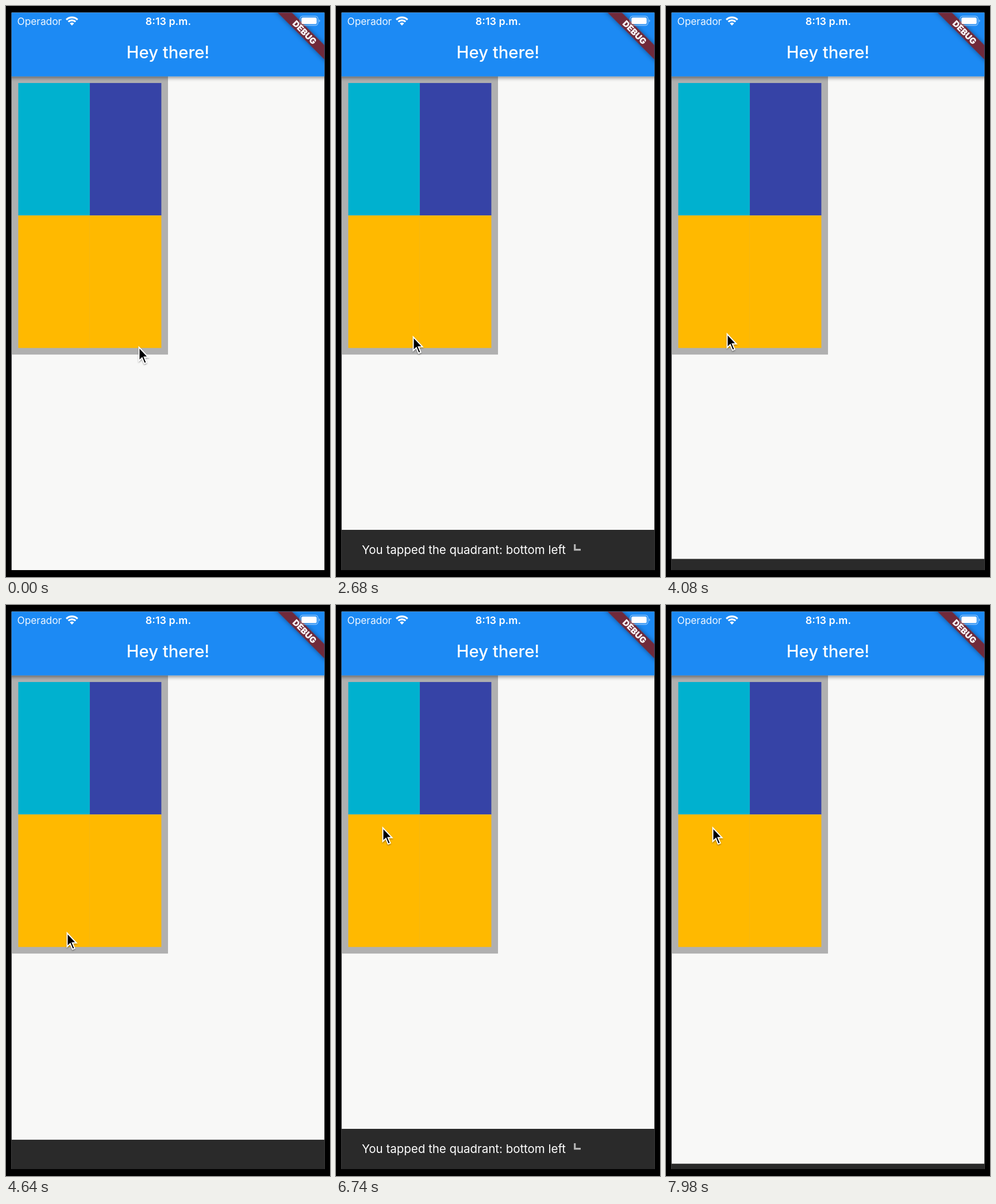
An HTML page for the animation above (8 s loop, 564 by 993 pixels).

```html
<!DOCTYPE html>
<html lang="en">
<head>
<meta charset="utf-8">
<title>Tapped quadrant</title>
<style>
  html, body { margin: 0; width: 100%; height: 100%; overflow: hidden; background: #000; }
  svg { display: block; width: 100%; height: 100%; }
  text { font-family: Inter, "Open Sans", sans-serif; fill: #fff; }
</style>
</head>
<body>
<svg viewBox="0 0 564 993">
  <defs>
    <clipPath id="screen"><rect x="9.7" y="11.6" width="544.6" height="969.4"/></clipPath>
    <filter id="barShadow" x="-5%" y="-10%" width="110%" height="130%">
      <feDropShadow dx="0" dy="3" stdDeviation="3" flood-opacity=".4"/>
    </filter>
    <filter id="bannerShadow" x="-20%" y="-80%" width="140%" height="260%">
      <feDropShadow dx="0" dy="0" stdDeviation="4" flood-opacity=".45"/>
    </filter>
    <filter id="cursorShadow" x="-50%" y="-50%" width="200%" height="200%">
      <feDropShadow dx="0" dy="1.5" stdDeviation="1.3" flood-opacity=".4"/>
    </filter>
  </defs>

  <g clip-path="url(#screen)">
    <rect x="9" y="11" width="546" height="970" fill="#f8f8f7"/>

    <rect x="9" y="122" width="273" height="484.2" fill="#b0b0b0"/>
    <g transform="translate(145.9 364.3)">
      <rect x="-124.5" y="-230.4" width="124.5" height="230.4" fill="#00b1cf"/>
      <rect y="-230.4" width="124.5" height="230.4" fill="#3643a6"/>
      <rect x="-124.5" width="124.5" height="230.4" fill="#ffb900"/>
      <rect width="124.5" height="230.4" fill="#ffb900"/>
    </g>

    <rect x="0" y="0" width="564" height="122.4" fill="#1c8af4" filter="url(#barShadow)"/>
    <text x="282" y="91" font-size="29.2" font-weight="500" text-anchor="middle">Hey there!</text>

    <g id="snackbar">
      <rect x="9" y="911" width="546" height="70" fill="#2a2a2a"/>
      <g id="message">
        <text x="45" y="953" font-size="20.47">You tapped the quadrant: bottom left</text>
        <path d="M415.7 936V945.6H426" fill="none" stroke="#b4b4b4" stroke-width="3.2"/>
      </g>
    </g>

    <g transform="translate(519.8 46) rotate(45)">
      <rect x="-80" y="-8.8" width="160" height="17.6" fill="#702a3b" filter="url(#bannerShadow)"/>
      <text y="5.3" font-size="14.8" font-weight="900" text-anchor="middle">DEBUG</text>
    </g>

    <text x="19.5" y="33" font-size="17.3" fill-opacity=".93">Operador</text>
    <text x="282.5" y="33" font-size="17.9" font-weight="600" text-anchor="middle">8:13 p.m.</text>

    <g transform="translate(114.8 34)" fill="none" stroke="#fff" stroke-width="3.1">
      <path d="M-9.8 -10.2A14.2 14.2 0 0 1 9.8 -10.2"/>
      <path d="M-6.3 -6.6A9.2 9.2 0 0 1 6.3 -6.6"/>
      <path d="M0 0L-3.6 -3.8A5.3 5.3 0 0 1 3.6 -3.8Z" fill="#fff" stroke="none"/>
    </g>

    <g fill="#fff">
      <rect x="512" y="17.7" width="31" height="16" rx="4.5" fill="none" stroke="#fff" stroke-opacity=".45" stroke-width="1.4"/>
      <rect x="514.2" y="19.9" width="26.6" height="11.6" rx="2.6"/>
      <path d="M544.6 23.2Q546.8 24 546.8 25.7T544.6 28.2Z" fill-opacity=".45"/>
    </g>
  </g>

  <g id="cursor">
    <path d="M1 1.5V25L6.3 20L10.3 29.6L14 28L10 18.5H17Z" fill="#000" stroke="#fff" stroke-width="1.9" filter="url(#cursorShadow)"/>
  </g>
</svg>

<script>
  const LOOP = 8000;
  const SLIDE = 15;        // ticks per snackbar transition
  const BAR_HEIGHT = 70;
  const shows = [2, 93];
  const hides = [77, 159];
  const moves = [
    { from: 46, to: 63.3, dx: -125, dy: -23 },
    { from: 119, to: 142, dx: -25, dy: -183 }
  ];
  const [snackbar, message, cursor] =
    ["snackbar", "message", "cursor"].map(id => document.getElementById(id));

  const clamp = x => Math.min(1, Math.max(0, x));
  const smooth = x => x * x * (3 - 2 * x);
  const bezier = (a, b, s) => 3 * (1 - s) ** 2 * s * a + 3 * (1 - s) * s * s * b + s ** 3;

  // cubic-bezier(.4, 0, .2, 1)
  function fastOutSlowIn(x) {
    let low = 0, high = 1;
    for (let i = 0; i < 24; i++) {
      const mid = (low + high) / 2;
      if (bezier(0.4, 0.2, mid) < x) low = mid; else high = mid;
    }
    return bezier(0, 1, high);
  }

  // Ticks come in threes, lasting 20, 100 and 20 ms.
  function tickAt(ms) {
    const rest = ms % 140;
    return 3 * Math.floor(ms / 140) + (rest < 20 ? 0 : rest < 120 ? 1 : 2);
  }

  function draw(ms) {
    const tick = tickAt(ms);
    const progress = start => clamp((tick - start) / SLIDE);
    const total = starts => starts.reduce((sum, start) => sum + progress(start), 0);
    const shown = clamp(total(shows) - total(hides));
    const hiding = hides.some(start => tick >= start && tick <= start + SLIDE);
    const height = shown > 0 ? fastOutSlowIn(shown) : 0;

    snackbar.setAttribute("transform", `translate(0 ${BAR_HEIGHT * (1 - height)})`);
    message.setAttribute("opacity", hiding ? 1 : fastOutSlowIn(clamp((shown - 0.72) / 0.28)));

    let x = 230.5, y = 592;
    for (const { from, to, dx, dy } of moves) {
      const part = smooth(clamp((tick - from) / (to - from)));
      x += dx * part;
      y += dy * part;
    }
    cursor.setAttribute("transform", `translate(${x} ${y})`);
  }

  const begin = performance.now();
  function loop() {
    draw((performance.now() - begin) % LOOP);
    requestAnimationFrame(loop);
  }
  draw(0);
  requestAnimationFrame(loop);
</script>
</body>
</html>
```
